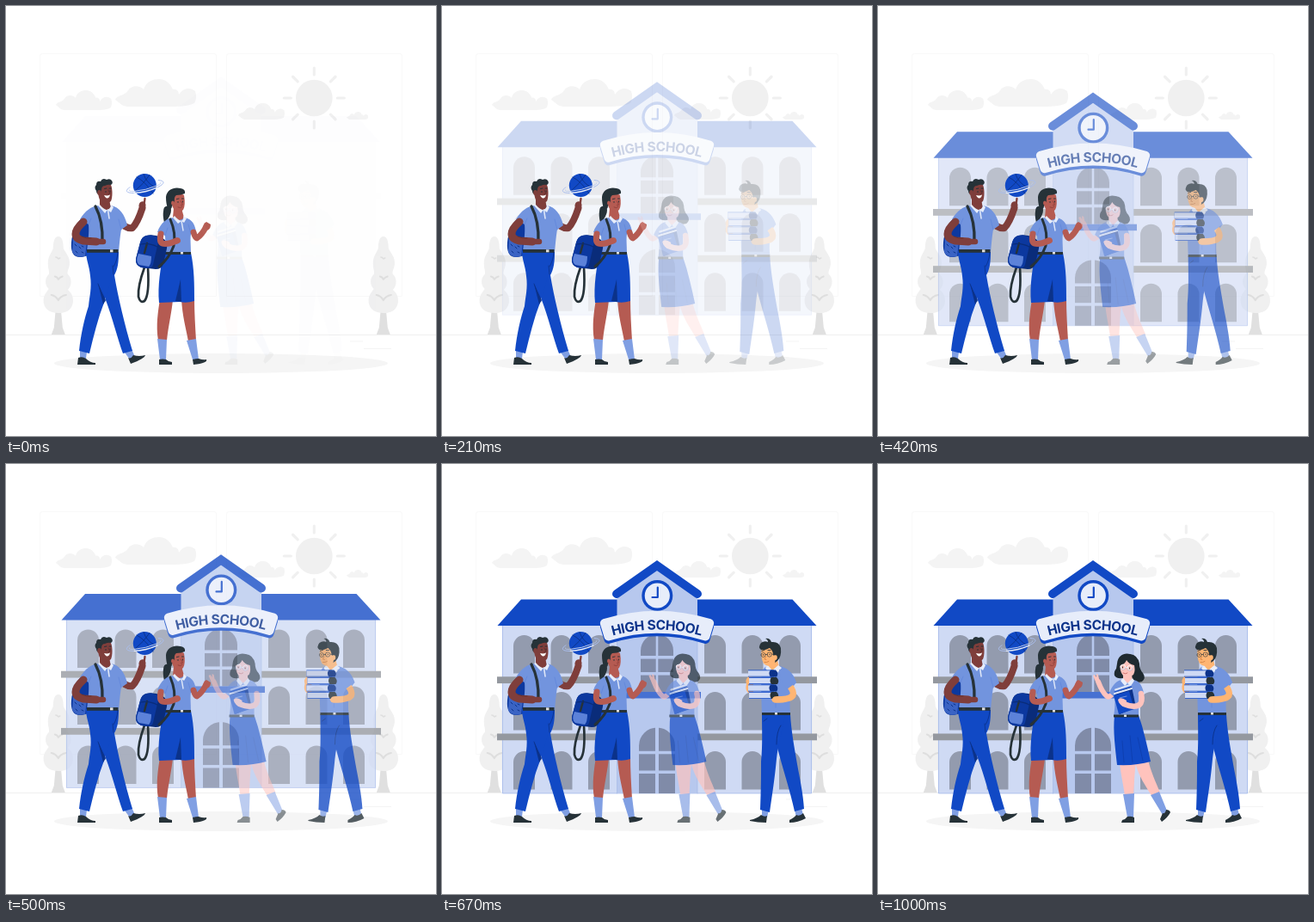
An HTML page with a canvas for the animation above (1.04 s loop, 500 px wide and 500 px high).

```html
<!DOCTYPE html>
<html lang="en">
<head>
<meta charset="utf-8">
<title>High school</title>
<style>
html, body { margin: 0; width: 100%; height: 100%; overflow: hidden; background: #fff; }
canvas { display: block; width: 500px; height: 500px; }
</style>
</head>
<body>
<canvas id="stage"></canvas>
<script>
const SIZE = 500, LOOP = 1040, FPS = 24, STEPS = 25;
const BLUE = '#1149c5', NAVY = '#0b328a', DENIM = '#0c389f', SHIRT = '#7294de', SOCK = '#809fe3', PALE = '#cfdaf4', DARK = '#263238';
const dpr = window.devicePixelRatio || 1;

function prepare(canvas) {
  canvas.width = canvas.height = SIZE * dpr;
  const c = canvas.getContext('2d');
  c.scale(dpr, dpr);
  c.lineCap = c.lineJoin = 'round';
  return c;
}
const main = prepare(document.getElementById('stage'));
const layer = prepare(document.createElement('canvas'));
const still = prepare(document.createElement('canvas'));
const back = prepare(document.createElement('canvas'));
let g = main;

function fill(color, d) {
  g.fillStyle = color;
  g.fill(new Path2D(d));
}
function line(color, width, d) {
  g.strokeStyle = color;
  g.lineWidth = width;
  g.stroke(new Path2D(d));
}
function box(color, x, y, w, h) {
  g.fillStyle = color;
  g.fillRect(x, y, w, h);
}
function oval(color, x, y, rx, ry = rx, turn = 0) {
  g.fillStyle = color;
  g.beginPath();
  g.ellipse(x, y, rx, ry, turn, 0, 7);
  g.fill();
}
function arch(color, x, y, w, h) {
  const r = w / 2;
  fill(color, `M${x} ${y + h}V${y + r}a${r} ${r} 0 0 1 ${w} 0V${y + h}Z`);
}

// ---- Scenery ----
function cloud(x, y, w, h) {
  g.save();
  g.translate(x, y);
  g.scale(w / 94, h / 32);
  fill('#f4f4f4', 'M0 24C2 18 11 20 15 13C19 7 28 7 33 12C36 3 43 0 51 0C59 0 64 5 67 12C72 11 74 15 74 18C79 10 87 9 93 14C95 20 94 25 92 28C85 32 72 32 60 32H15C8 32 6 28 0 24Z');
  g.restore();
}
function tree(x) {
  g.save();
  g.translate(x, 0);
  fill('#e0e0e0', 'M-3 352H3L5 374L8 382H-8L-5 374Z');
  fill('#f0f0f0', 'M0 268C5 268 6 276 6 282C9 288 14 292 13 301C12 307 10 308 11 312C16 316 16 325 11 330C15 333 18 338 17 345C15 355 8 357 0 357C-9 357 -16 353 -17 345C-18 338 -15 334 -11 329C-16 325 -16 316 -11 312C-10 308 -12 306 -12 299C-12 291 -8 287 -6 282C-6 276 -5 268 0 268Z');
  line('#dedede', 2.2, 'M-8 336Q-3 337 0 342Q3 337 9 336');
  line('#dedede', 1.8, 'M-4 314.500Q-1 315 0 318Q2 315 5 314.500');
  line('#dedede', 1.4, 'M-3 292Q-1 292 0 294L2 293');
  g.restore();
}
function scenery() {
  box('#fff', 0, 0, SIZE, SIZE);
  line('#f9f9f9', 1, 'M42 55.500H242Q244.500 55.500 244.500 58V337.500H39.500V58Q39.500 55.500 42 55.500ZM259 55.500H458Q460.500 55.500 460.500 58V337.500H256.500V58Q256.500 55.500 259 55.500Z');
  box('#ededed', 0, 382, SIZE, 0.8);
  box('#f2f2f2', 400, 389.500, 15, 0.8);
  box('#f2f2f2', 416, 398, 32, 0.8);
  cloud(58, 98, 65, 23);
  cloud(127, 85, 94, 32);
  cloud(270, 113, 54, 19);
  cloud(396, 123, 25, 9);
  oval('#f0f0f0', 358.3, 107, 21.3);
  for (let i = 0; i < 8; i++) {
    const a = i * Math.PI / 4, x = Math.cos(a), y = Math.sin(a);
    line('#f0f0f0', 3.2, `M${358.3 + 27 * x} ${107 + 27 * y}L${358.3 + 35 * x} ${107 + 35 * y}`);
  }
  tree(60.8);
  tree(438.8);
  oval('#f5f5f5', 250, 415.500, 194, 11.500);
}

// ---- School ----
function banner(dy, color) {
  const a = 0.297, up = -Math.PI / 2;
  g.beginPath();
  g.arc(250, 385 + dy, 209, up - a, up + a);
  g.arc(250, 385 + dy, 193, up + a, up - a, true);
  g.closePath();
  g.fillStyle = g.strokeStyle = color;
  g.lineWidth = 10;
  g.fill();
  g.stroke();
}
function archText(text, cx, cy, r) {
  g.font = '700 15.5px Inter, "Open Sans", sans-serif';
  g.fillStyle = NAVY;
  g.textAlign = 'center';
  g.textBaseline = 'alphabetic';
  const total = g.measureText(text).width;
  let x = -total / 2;
  for (const ch of text) {
    const w = g.measureText(ch).width;
    g.save();
    g.translate(cx, cy);
    g.rotate((x + w / 2) * 107 / total / r);
    g.fillText(ch, 0, -r + 5.600);
    g.restore();
    x += w;
  }
}
function school() {
  const glass = '#939bae', hall = '#b7c8ee', ledge = '#94989f';
  box(PALE, 70, 187, 360, 196);
  line('#9db4e8', 0.7, 'M70.400 188V383H429.600V188');
  for (const y of [199, 265, 334])
    for (const x of [83, 126.500, 170, 305, 348.500, 392]) arch(glass, x, y, 25, 44.500);
  box(ledge, 64, 247.300, 372, 7.800);
  box(ledge, 64, 313.500, 372, 7.800);
  fill(BLUE, 'M64.500 188L92 157.500H407.500L435.500 188Z');
  fill(hall, 'M203.500 383V150L250 117L297 150V383Z');
  line('#a5b9e6', 0.7, 'M203.500 188V383M297 188V383');
  arch('#808ba8', 231, 198, 38, 67);
  box(hall, 248.700, 198, 2.600, 68);
  box(hall, 230, 223, 40, 3.600);
  box(hall, 230, 242, 40, 3.600);
  box('#4671d2', 199, 265, 102, 7.500);
  arch('#808ba8', 229, 306.500, 42, 76.500);
  box(hall, 248, 306, 4, 77);
  box(hall, 229, 333.800, 42, 3.500);
  box(hall, 229, 356.500, 42, 3.500);
  g.lineJoin = 'miter';
  line(BLUE, 10, 'M203 151L250 118L297 151');
  g.lineJoin = 'round';
  oval(BLUE, 250.300, 153, 18);
  oval('#e7edfa', 250.300, 153, 14.600);
  line(BLUE, 2.200, 'M250.800 143.500V155H244.500');
  banner(3.500, BLUE);
  banner(0, '#e7edfa');
  archText('HIGH SCHOOL', 250, 385, 198);
}

// ---- Pupils ----
function ball() {
  const tilt = -0.24;
  oval(BLUE, 161.300, 208.500, 13.500);
  line(NAVY, 0.900, 'M152 199Q162 204 171 218M160 195.500Q163 206 174 211M167 196.500Q160 207 150 215');
  const ring = (color, w, rx, ry, from, to) => {
    g.strokeStyle = color;
    g.lineWidth = w;
    g.beginPath();
    g.ellipse(161.700, 210, rx, ry, tilt, from, to);
    g.stroke();
  };
  ring('#a9bdec', 1, 22, 5.500, 2.100, 3.800);
  ring('#a9bdec', 1, 22, 5.500, -0.700, 1);
  ring('#b7c8ee', 0.800, 19, 3.200, 2.300, 3.300);
  ring('#b7c8ee', 0.800, 19, 3.200, -0.200, 0.800);
  ring('#e7edfa', 1.300, 22, 5.500, 0.900, 2.250);
  ring('#cfdaf4', 0.900, 19, 3.200, 0.800, 2.350);
}
function tallBoy() {
  const skin = '#7f3e3b';
  fill(DENIM, 'M91 245C83 249 77 262 76 275C75 287 79 293 88 292L104 288V245Z');
  fill('#3a63c4', 'M78 270Q89 277 94 274L92 291Q82 294 77 286Z');
  line(NAVY, 1, 'M80 277l2 2M85 280l2 2M81 285l2 2M88 286l2 1M88 279l2 1');
  line(NAVY, 0.8, 'M78 270Q89 277 94 274');
  line(skin, 8, 'M138 256Q143 259 147 258Q153 252 158.500 235');
  line(skin, 2.300, 'M160 235L161.500 224');
  oval(skin, 158.500, 232, 4, 4.800, 0.2);
  fill(SOCK, 'M86 401L94 402L93 410H86ZM138 403L146 399L150 408L144 411Z');
  fill(DARK, 'M84 409Q89 407 93 410Q98 415 104 415V417H83ZM142 409Q145 411 148 406Q155 408 162 406Q161 410 145 416Z');
  fill(BLUE, 'M107 286L131 286C131 298 130 306 126 313C130 337 138 371 147 401L136 404C130 388 123 360 116 342Z');
  fill(BLUE, 'M93 285H130C127 302 120 326 114 345C107 363 102 383 97 404L85 401C87 382 91 364 96 349C97 338 100 328 98 314C97 302 93 295 93 285Z');
  line(NAVY, 0.8, 'M124 302L125 312M107 323L115 343M130 287Q129 297 125 303');
  fill(NAVY, 'M107 323L116 342L113 347Z');
  fill(SHIRT, 'M108 232C99 233 92 238 86 248L96 254C97 264 95 275 94 286H131C132 275 133 265 134 260L141 255C138 242 132 234 122 232Z');
  line('#5f85da', 0.7, 'M96 254L99 247M134 260L131 248');
  fill(skin, 'M109 225H120L122 235Q117 240 109 234Z');
  fill('#e7edfa', 'M107 232L109 231Q114 237 118 237L115 241ZM118 237Q122 235 122 231L125 234L122 240Z');
  line('#dfe7f8', 1.600, 'M118.500 237L120 247');
  box(DARK, 94, 283, 36.500, 3.800);
  box('#e0e0e0', 121, 283.300, 3.500, 3);
  line(DARK, 3.300, 'M104 233Q113 250 112 275');
  line(skin, 9, 'M90 251Q81 259 81 265Q81 271 90 273L105 274');
  line(skin, 6.500, 'M105 274H113');
  line('#64302f', 0.8, 'M88 268Q94 271 99 270');
  fill(skin, 'M109 207Q117 202 122 208C124 213 124 222 122 227Q118 231 111 229Q107 223 107 215Z');
  fill(DARK, 'M105 215Q102 211 105 208Q105 203 110 204Q112 199 117 202Q121 200 123 203Q125 206 122 208Q119 207 115 209Q111 209 111 214L109 219Q105 219 105 215Z');
  oval(skin, 108.500, 217, 2.300, 3);
  line(DARK, 1, 'M114.500 212.500L117 212M120 212H122M116 215.500V216.500M121 215V216');
  line('#5d2b2b', 0.8, 'M119 214L121 218L119 218.500');
  fill('#fff', 'M114 220Q118 221 121 219.500Q120 224 117 223.500Q115 222.500 114 220Z');
  ball();
}
function bagGirl() {
  const skin = '#b55b52';
  line(DARK, 2.700, 'M161 304Q153 326 154 338Q156 346 161 343Q167 336 165 304');
  fill(DARK, 'M191 233Q183 231 183 239Q182 243 184 252Q187 258 188 248Q192 242 192 237Z');
  fill(skin, 'M179 341H194C193 355 189 370 187 389H177C174 371 177 354 179 341ZM204 340L219 340C219 356 220 373 221 389L212 390C209 373 205 361 204 340Z');
  fill(SOCK, 'M176 387L187 388L186 411H179ZM210 389L221 387L224 411H217Z');
  fill(DARK, 'M178 411Q182 410 186 411Q189 414 193 414V417H178ZM217 411Q221 410 224 410Q229 412 233 411Q235 415 218 417Z');
  fill(BLUE, 'M183 287H215C219 306 219 324 219 343Q210 346 202 344L178 345C176 325 180 304 183 287Z');
  fill(NAVY, 'M203 318L197 343L204 344Z');
  fill(SHIRT, 'M196 246C187 246 180 252 176 263L185 267C186 274 184 281 183 288H215C215 278 214 271 215 265L221 262C219 251 214 246 205 246Z');
  line('#5f85da', 0.7, 'M185 267L188 258M215 265L212 254');
  fill(skin, 'M195 235H204L207 246Q202 252 194 246Z');
  fill('#e7edfa', 'M194 246L196 244Q200 249 204 250L200 253ZM204 250Q207 248 206 244L210 247L207 252Z');
  line('#dfe7f8', 1.400, 'M204 250L206 261');
  box(DARK, 183, 286, 32, 3);
  box('#e0e0e0', 203, 286, 3, 2.500);
  line(skin, 6.800, 'M218 263Q220 270 222 270Q228 266 233 256');
  fill(skin, 'M229 259Q229 253 233 251L238 254Q238 260 233 261Z');
  fill('#0a2c7a', 'M163 267Q171 265 181 269Q189 274 187 282L183 300Q181 306 174 306L157 304Q150 301 151 294L156 275Q158 268 163 267Z');
  fill(DENIM, 'M163 267Q171 265 178 270L171 301Q170 305 164 305L157 304Q150 301 151 294L156 275Q158 268 163 267Z');
  fill('#5c82d9', 'M154 288L169 291Q169 300 166 303L155 301Q150 298 154 288Z');
  line(DARK, 2.400, 'M164 276L161 287');
  line('#0a2c78', 1.200, 'M157 277Q166 275 176 280');
  line(DARK, 3, 'M191 248Q198 264 195 279Q190 293 178 303');
  line(skin, 7, 'M180 265Q178 275 182 276Q187 278 198 273');
  oval(skin, 199, 273, 4, 3.500, -0.3);
  fill(skin, 'M193 219Q201 215 207 220Q209 232 206 237Q201 242 195 236Q191 230 193 219Z');
  fill(DARK, 'M186 222C187 213 196 210 203 212Q209 213 208 218Q204 220 198 220Q195 222 196 228L193 232Q193 238 188 235Q186 230 186 222Z');
  oval(skin, 194, 229, 2, 2.600);
  line(DARK, 0.9, 'M198.500 224.500L201 224M204.500 224H206.500M200 227.500V228.500M205.500 227V228');
  line('#8c3b38', 0.8, 'M203.500 227L205.500 231L203.500 231.500M200 234Q203 236 205 233');
}
function glassesGirl() {
  const skin = '#ffc3bd', hair = '#1f2a30';
  fill(hair, 'M278 232C279 222 287 219 293 221Q302 222 304 232Q304 239 308 243Q312 249 307 253Q301 255 295 252L284 249Q278 250 275 246Q274 241 277 238Z');
  fill(skin, 'M281 347L300 346C298 360 298 372 297 386H287C285 371 282 359 281 347ZM299 347L314 344C317 357 323 370 328 382L319 387C311 374 303 363 299 347Z');
  fill(SOCK, 'M285 384L298 383L297 411H290ZM317 385L327 381L336 403L331 408Z');
  fill(DARK, 'M284 414Q288 413 290 410Q294 409 298 411V417H283ZM328 413L331 406Q334 407 335 402Q339 402 340 405Q337 411 330 416Z');
  fill(BLUE, 'M275 293L303 292C309 309 313 328 317 346Q300 351 278 350C276 331 273 310 275 293Z');
  line('#0d3ca8', 0.7, 'M284 322L286 347M293 316L296 347M302 318L308 345');
  line(skin, 6, 'M273 267Q269 272 266 270Q261 266 256 253');
  fill(skin, 'M258 255Q254 256 252 251L250 246L252 245L254 248L254 244L256 245L257 250Z');
  fill(SHIRT, 'M286 251C279 250 273 256 269 266L275 271C276 279 275 287 274 294H303C303 283 303 275 303 269L309 266C307 256 302 251 296 251Z');
  fill(skin, 'M285 244H295L296 252Q291 257 285 252Z');
  fill('#e7edfa', 'M282 252L285 249L290 255L287 258ZM290 255L296 249L298 252L294 258Z');
  box(DARK, 274, 291.500, 29, 3);
  box('#e0e0e0', 286, 291.500, 3, 2.500);
  fill(NAVY, 'M275 266L295 259L300 283L281 291Z');
  fill(BLUE, 'M274 269L292 264L298 285L280 291Z');
  line('#dfe7f8', 2, 'M276 262.500L293 257M275 267L295 261');
  line(BLUE, 1, 'M275 265L294 259');
  line('#6f92df', 1.100, 'M281 272L289 270');
  line(skin, 6.500, 'M306 267Q308 277 304 280Q298 284 286 279');
  fill(skin, 'M289 275Q282 270 279 274Q280 281 288 282Z');
  fill(skin, 'M282 229Q289 222 298 229Q300 239 297 245Q291 250 285 246Q280 240 282 229Z');
  fill(hair, 'M279 237Q279 224 291 221Q302 222 301 236L301 243Q298 239 298 234Q292 233 289 228Q287 233 282 234Z');
  line('#fff', 0.9, 'M282 236a2.800 2.800 0 1 0 5.600 0a2.800 2.800 0 1 0 -5.600 0M290 237a2.800 2.800 0 1 0 5.600 0a2.800 2.800 0 1 0 -5.600 0M287.500 236.500H290');
  line('#7d92bd', 0.4, 'M281.500 236a3.300 3.300 0 1 0 6.600 0M289.500 237a3.300 3.300 0 1 0 6.600 0');
  line(hair, 0.9, 'M284.500 236V237M292.500 237V238');
  line('#cf6f69', 0.9, 'M285 243Q288 245 290 243');
}
function bookBoy() {
  const skin = '#ffb573';
  fill(SOCK, 'M372 401L380 402L378 411H372ZM410 402L418 400L420 408L412 411Z');
  fill(DARK, 'M358 414Q367 412 371 408Q375 411 378 409L377 417Q367 417 358 415ZM404 414Q410 411 412 408Q416 410 420 406L423 412Q414 417 404 417Z');
  fill(BLUE, 'M385 291H405C406 310 410 331 413 349C416 365 420 384 421 401L410 404C405 380 396 354 389 326Z');
  fill(BLUE, 'M372 291H399C396 309 391 325 389 343C387 365 384 384 381 405L370 402C371 378 371 365 371 346C373 327 372 308 372 291Z');
  line(NAVY, 0.9, 'M394 304Q389 311 389 326M374 299L378 296');
  fill(SHIRT, 'M376 236C370 240 371 255 372 290H405C404 278 405 268 406 262L412 254C408 242 401 236 391 235Z');
  fill(skin, 'M379 228H390L392 236Q386 243 378 237Z');
  fill('#e7edfa', 'M376 237L379 234L384 240L380 244ZM384 240L391 234L395 237L390 243Z');
  line('#5f85da', 0.7, 'M406 262L402 252M388 243V283');
  box(DARK, 372, 289, 33, 3);
  box('#e0e0e0', 387, 289, 3, 2.500);
  fill(skin, 'M357 247Q352 250 354 256Q352 262 356 266H362V248Z');
  for (let i = 0; i < 4; i++) {
    const x = 356 + i % 2, y = 239.500 + i * 8.500;
    box(BLUE, x, y, 30, 8);
    box(PALE, x, y + 0.800, 26, 6.400);
    fill(i % 2 ? DARK : NAVY, `M${x + 26} ${y}H${x + 32}Q${x + 36} ${y + 4} ${x + 33} ${y + 8}H${x + 26}Q${x + 23} ${y + 4} ${x + 26} ${y}Z`);
  }
  line(skin, 7.500, 'M403 256Q410 265 408 269Q405 274 388 274');
  fill(skin, 'M391 270Q385 271 383 274L385 277H392Z');
  fill(SHIRT, 'M392 239Q404 236 412 254L401 262Q394 253 392 239Z');
  fill(skin, 'M372 213Q380 206 389 213Q391 225 386 233Q379 237 374 232Q370 225 372 213Z');
  fill(DARK, 'M371 216Q367 213 371 208Q375 205 379 207Q379 204 376 203Q381 202 383 207Q392 206 394 214Q395 224 390 229L387 231Q389 225 385 222Q385 217 381 214Q375 217 371 216Z');
  oval(skin, 387.500, 225, 2.300, 3);
  line(DARK, 0.6, 'M371 222a2.500 2.500 0 1 0 5 0a2.500 2.500 0 1 0 -5 0M378 221.500a2.700 2.700 0 1 0 5.400 0a2.700 2.700 0 1 0 -5.400 0M376 221.500H378M383.400 221L388 222');
  line(DARK, 0.9, 'M373.500 221.500V222.300M381 221V221.800M372 217.500L375 216.500M379 216.500L382 216.500');
  line('#d58345', 0.9, 'M376.500 224L375 227L377 227.500M375 230.500Q378 231 380 229.500');
}

// ---- Motion ----
function springy(x) {
  const curve = (s, a, b) => 3 * (1 - s) * (1 - s) * s * a + 3 * (1 - s) * s * s * b + s * s * s;
  let lo = 0, hi = 1;
  for (let i = 0; i < 24; i++) {
    const mid = (lo + hi) / 2;
    if (curve(mid, 0.36, 0.5) < x) lo = mid; else hi = mid;
  }
  return curve((lo + hi) / 2, -0.01, 1.38);
}
function slide(draw, amount, dx, dy) {
  const alpha = Math.min(1, Math.max(0, amount));
  g = layer;
  g.clearRect(0, 0, SIZE, SIZE);
  g.save();
  g.translate(dx * (1 - amount), dy * (1 - amount));
  draw();
  g.restore();
  main.globalAlpha = alpha;
  main.drawImage(layer.canvas, 0, 0, SIZE, SIZE);
  main.globalAlpha = 1;
}

g = back;
scenery();
g = still;
tallBoy();
bagGirl();

let start = null, shown = -1;
function tick(now) {
  if (start === null) start = now;
  const t = (now - start) % LOOP;
  const step = Math.min(STEPS - 1, Math.floor(t * FPS / 1000 + 0.1));
  if (step !== shown) {
    shown = step;
    const p = (step + 1) / STEPS, e = springy(p);
    main.drawImage(back.canvas, 0, 0, SIZE, SIZE);
    slide(school, e, 0, -30);
    main.drawImage(still.canvas, 0, 0, SIZE, SIZE);
    slide(glassesGirl, p, -30, 0);
    slide(bookBoy, e, -30, 0);
  }
  requestAnimationFrame(tick);
}
tick(performance.now());
</script>
</body>
</html>
```
